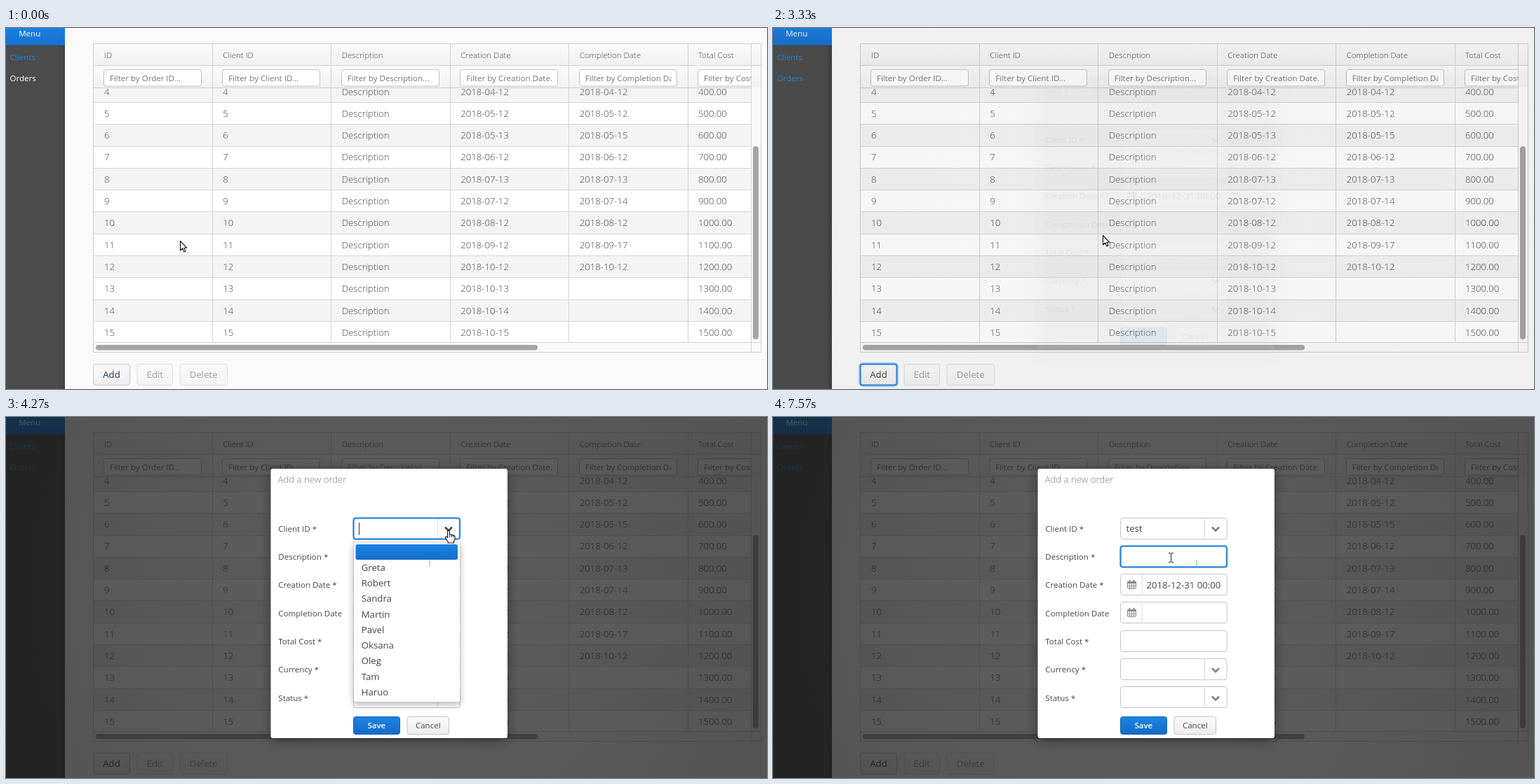
These frames come from a looping animation (1085 px wide and 516 px high, 8 s). An HTML page with a canvas:

```html
<!DOCTYPE html>
<html lang="en">
<head>
<meta charset="utf-8">
<title>Order form</title>
<style>
html, body { margin: 0; width: 100%; height: 100%; overflow: hidden; background: #fafafa; }
canvas { display: block; }
</style>
</head>
<body>
<canvas id="stage" width="1085" height="516"></canvas>
<script>
const W = 1085, H = 516, LOOP = 8000;
const ctx = document.getElementById('stage').getContext('2d');
const BIG = 13.2, SMALL = 11.54;
const BLUE = ['#1b85e2', '#166bc9'];
const COLS = [124.5, 294.5, 463.5, 633.5, 802.5, 972.5];
const TEXT_X = [140, 309.3, 478.8, 648.2, 817.7, 987];
const HEADERS = ['ID', 'Client ID', 'Description', 'Creation Date', 'Completion Date', 'Total Cost'];
const FILTERS = ['Order ID', 'Client ID', 'Description', 'Creation Date', 'Completion Date', 'Cost'];
const CREATED = ['04-12', '05-12', '05-13', '06-12', '07-13', '07-12', '08-12', '09-12', '10-12', '10-13', '10-14', '10-15'];
const DONE = ['04-12', '05-12', '05-15', '06-12', '07-13', '07-14', '08-12', '09-17', '10-12'];
const LABELS = ['Client ID *', 'Description *', 'Creation Date *', 'Completion Date', 'Total Cost *', 'Currency *', 'Status *'];
const PAGE_ONE = ['', 'Greta', 'Robert', 'Sandra', 'Martin', 'Pavel', 'Oksana', 'Oleg', 'Tam', 'Haruo'];
const PAGE_TWO = ['Mark', 'Doina', 'Tracy', 'Elena', 'Rosalie', 'Ibrahim', 'test'];

// Pointer path: time, x, y
const PATH = [
  [0, 248, 304], [309, 248, 304], [310, 247, 309], [400, 247, 309],
  [620, 205, 385], [860, 143, 482], [960, 143, 482], [1180, 164, 488],
  [1400, 173, 496], [1620, 145, 498], [1820, 130, 489], [2060, 168, 494],
  [2220, 158, 497], [2380, 149, 494], [2790, 149, 494], [3090, 285, 415],
  [3330, 469, 296], [3490, 588, 231], [3690, 594, 220], [3980, 627, 168],
  [4270, 631, 162], [4340, 631, 162], [4510, 582, 262], [4740, 560, 403],
  [4890, 558, 403], [5180, 556, 345], [5500, 551, 334], [6180, 551, 334],
  [6500, 557, 270], [6860, 567, 201], [8000, 567, 201]
];
// Pointer shape from each time on
const SHAPES = [[0, 'arrow'], [780, 'hand'], [2850, 'arrow'], [3450, 'beam'], [3650, 'arrow'],
  [3900, 'hand'], [6260, 'arrow'], [6400, 'beam'], [6620, 'arrow'], [6780, 'beam']];

const clamp = v => Math.max(0, Math.min(1, v));
const ramp = (t, from, to) => clamp((t - from) / (to - from));
const between = (t, a, b) => t >= a && t < b;

function pointerAt(t) {
  const i = PATH.findIndex(p => p[0] > t);
  const [t0, x0, y0] = PATH[i - 1], [t1, x1, y1] = PATH[i];
  const k = (t - t0) / (t1 - t0);
  return [x0 + (x1 - x0) * k, y0 + (y1 - y0) * k];
}

function text(str, x, cy, size, color, weight = 400, align = 'left') {
  ctx.font = `${weight} ${size}px "Open Sans", sans-serif`;
  ctx.textAlign = align;
  ctx.fillStyle = color;
  ctx.fillText(str, x, cy + size * 0.357);
}

function shade(y, h, [top, bottom]) {
  const g = ctx.createLinearGradient(0, y, 0, y + h);
  g.addColorStop(0, top);
  g.addColorStop(1, bottom);
  return g;
}

function rect(x, y, w, h, fill) {
  ctx.fillStyle = fill;
  ctx.fillRect(x, y, w, h);
}

function box(x, y, w, h, r, fill, stroke, line = 1) {
  ctx.beginPath();
  ctx.roundRect(x, y, w, h, r);
  if (fill) { ctx.fillStyle = fill; ctx.fill(); }
  if (stroke) { ctx.strokeStyle = stroke; ctx.lineWidth = line; ctx.stroke(); }
}

function line(points, color, width = 1) {
  ctx.beginPath();
  points.forEach(([x, y]) => ctx.lineTo(x, y));
  ctx.strokeStyle = color;
  ctx.lineWidth = width;
  ctx.stroke();
}

function clipped(x, y, w, h, draw) {
  ctx.save();
  ctx.beginPath();
  ctx.rect(x, y, w, h);
  ctx.clip();
  draw();
  ctx.restore();
}

function panel(x, y, w, h, blur, alpha) {
  ctx.save();
  ctx.shadowColor = `rgba(0,0,0,${alpha})`;
  ctx.shadowBlur = blur;
  ctx.shadowOffsetY = 3;
  box(x, y, w, h, 3, '#fff');
  ctx.restore();
}

function button(label, x, y, w, h, size, color = '#474747') {
  box(x, y, w, h, 3, shade(y, h, ['#fafafa', '#ededed']), '#c5c5c5');
  text(label, x + w / 2, y + h / 2, size, color, 400, 'center');
}

function sidebar(t) {
  rect(0, 0, 84, H, '#4b4c4b');
  const g = ctx.createLinearGradient(74, 0, 84, 0);
  g.addColorStop(0, 'rgba(0,0,0,0)');
  g.addColorStop(1, 'rgba(0,0,0,.16)');
  rect(74, 0, 10, H, g);
  rect(0, 0, 84, 25, shade(0, 25, ['#1a7fdd', '#1870cf']));
  rect(0, 24, 84, 1, '#155fae');
  text('Menu', 33.7, 8, SMALL, '#fff', 400, 'center');
  text('Clients', 5.5, 42, SMALL, '#2386e4');
  text('Orders', 5.5, 72, SMALL, t < 2610 ? '#fff' : '#2386e4');
}

function table() {
  rect(124, 22, 953, 442, '#fafafa');
  clipped(124, 85, 938, 365, () => {
    CREATED.forEach((date, i) => {
      const y = 75.6 + 31.3 * i, mid = y + 15.2, n = i + 4;
      rect(124, Math.round(y), 938, 32, i % 2 ? '#fff' : '#f4f4f4');
      rect(124, Math.round(y) - 1, 938, 1, '#d8d8d8');
      const done = DONE[i] ? '2018-' + DONE[i] : '';
      [n, n, 'Description', '2018-' + date, done, n + '00.00'].forEach((cell, c) =>
        text(String(cell), TEXT_X[c], mid, BIG, '#474747', 300));
    });
  });
  rect(124, 22, 953, 32, shade(22, 32, ['#fafafa', '#f1f1f1']));
  rect(124, 54, 953, 31, shade(54, 31, ['#fafafa', '#f1f1f1']));
  rect(124, 53, 953, 1, '#d4d4d4');
  rect(124, 85, 938, 1, '#d0d0d0');
  clipped(124, 22, 938, 64, () => {
    HEADERS.forEach((name, c) => {
      const x = TEXT_X[c];
      text(name, x, 38.5, SMALL, '#474747', 300);
      box(Math.round(x) - 0.5, 59.5, 139, 23.5, 3, '#fff', '#c2c2c2');
      clipped(x + 7, 60, 124, 23, () =>
        text(`Filter by ${FILTERS[c]}...`, x + 8, 71.5, SMALL, '#757575'));
    });
  });
  COLS.slice(1).forEach(x => line([[x, 22], [x, 450]], '#d4d4d4'));
  line([[1062.5, 22], [1062.5, 464]], '#d4d4d4');
  line([[124, 449.5], [1077, 449.5]], '#d4d4d4');
  box(1065, 169, 8, 276, 4, '#a5a5a5');
  box(128, 453, 630, 7.5, 4, '#a5a5a5');
  box(124.5, 22.5, 952, 441, 0, null, '#d0d0d0');
}

function toolbar(t) {
  button('Add', 124.5, 480.5, 52, 30, BIG, t < 2610 ? '#183a5e' : '#404040');
  if (between(t, 2610, 3400)) {
    box(124, 480, 53, 31, 4, null, 'rgba(25,125,225,.35)', 4);
    box(124.5, 480.5, 52, 30, 3, null, '#2180dc', 1.5);
  }
  ctx.globalAlpha = 0.5;
  button('Edit', 187, 480.5, 50.5, 30, BIG);
  button('Delete', 248, 480.5, 67.5, 30, BIG);
  ctx.globalAlpha = 1;
}

function curtain(t) {
  const g = ctx.createRadialGradient(W / 2, H / 2, 0, W / 2, H / 2, 600);
  g.addColorStop(0, '#222');
  g.addColorStop(1, '#131313');
  ctx.globalAlpha = 0.72 * ramp(t, 3310, 3680);
  rect(0, 0, W, H, g);
  ctx.globalAlpha = 1;
}

function chevron(y, color) {
  ctx.lineJoin = 'miter';
  line([[626, y - 2.5], [631, y + 2.5], [636, y - 2.5]], color, 2.6);
}

function calendar(x, y) {
  const c = '#8a8a8a';
  box(x - 5.5, y - 4.5, 12, 10, 1, null, c);
  rect(x - 6, y - 5, 13, 3, c);
  for (const dx of [-3.5, 2.5]) rect(x + dx, y - 7, 2, 4, c);
  for (const d of [-2.5, 0.5, 3.5]) line([[x + d, y - 2], [x + d, y + 6]], c, 0.8);
  for (const d of [0.5, 3]) line([[x - 5, y + d], [x + 6, y + d]], c, 0.8);
}

function field(i, focused, hot) {
  const y = 159.5 + 40.33 * i, top = Math.round(y - 15) - 0.5;
  text(LABELS[i], 388.3, y, SMALL, '#474747');
  box(495.5, top, 151.5, 30, 3, '#fff', '#c5c5c5');
  if (i === 0 || i > 4) {
    line([[615.5, top + 1], [615.5, top + 29]], '#dcdcdc');
    chevron(y + 0.5, hot ? '#474747' : '#808080');
  } else if (i === 2 || i === 3) {
    line([[526, top + 1], [526, top + 29]], '#dcdcdc');
    calendar(511, Math.round(y));
  }
  if (focused) {
    box(495.5, top, 151.5, 30, 3.5, null, 'rgba(25,125,225,.45)', 3);
    box(495.5, top, 151.5, 30, 3, null, '#2180dc', 1.5);
  }
}

function dialog(t) {
  ctx.globalAlpha = t < 3330 ? 0.07 * ramp(t, 3280, 3330) : 0.07 + 0.93 * ramp(t, 3330, 3470);
  panel(377.5, 74, 337.5, 385, 18, 0.4);
  text('Add a new order', 387.5, 89, BIG, '#7c7c7c', 300);
  const combo = between(t, 4040, 7020);
  LABELS.forEach((_, i) =>
    field(i, i === 0 ? combo : i === 1 && t >= 7020, i === 0 && between(t, 3940, 4400)));
  text('2018-12-31 00:00', 532.5, 240.2, BIG, '#474747');
  if (t >= 5420) text('test', 503.5, 159.5, BIG, '#474747');
  box(495.5, 428.5, 66, 25, 3, shade(428, 25, BLUE), '#1362b5');
  text('Save', 528.3, 441, SMALL, '#fff', 600, 'center');
  button('Cancel', 572, 428.5, 59.5, 25, SMALL);

  const comboCaret = between(t, 4080, 4590) || between(t, 5000, 5420);
  if (comboCaret) rect(503, 151, 1, 18, '#333');
  if (between(t, 5420, 5750) || between(t, 6260, 6780)) rect(526, 151, 1, 18, '#333');
  if (between(t, 7060, 7570)) rect(503, 191, 1, 18, '#333');
  ctx.globalAlpha = 1;
}

function popup(t, py) {
  const second = t >= 4890;
  const names = second ? PAGE_TWO : PAGE_ONE;
  const row = Math.floor((py - 182) / 22.25);
  let active = t < 4400 ? 0 : Math.max(0, Math.min(names.length - 1, row));
  if (t >= 5180) active = 6;
  if (second) {
    box(594, 405, 50, 21, 3, '#d9d9d9');
    text('10-16/16', 619, 417, 9.5, '#777', 400, 'center');
  }
  panel(495.5, 179, 152, 228.5, 8, 0.3);
  box(495.5, 179, 152, 228.5, 3, null, 'rgba(0,0,0,.12)');
  names.forEach((name, i) => {
    const y = 193 + 22.25 * i, on = i === active;
    if (on) box(498.5, y - 11, 145.5, 22, 2, shade(y - 11, 22, BLUE));
    text(name, 506.7, y, BIG, on ? '#fff' : '#474747');
  });
  if (second) {
    ctx.beginPath();
    ctx.moveTo(633, 192);
    ctx.lineTo(637, 188);
    ctx.lineTo(641, 192);
    ctx.fillStyle = '#c8c8c8';
    ctx.fill();
  }
}

const OUTLINE = {
  arrow: 'M.5 .5V14L3.6 11L5.9 16L8 15L5.8 10.3H9.8Z',
  hand: 'M-1.4 1Q0 -.8 1.4 1V6.2Q3 5.2 4.2 6.7Q5.8 5.8 6.8 7.4Q8.8 6.9 9 9V12.5L7.5 15V18H-.8V16L-4.6 10.8Q-4.8 8.6 -2.9 9.2L-1.4 10.6Z'
};

function pointer(t, x, y) {
  const shape = SHAPES.filter(s => s[0] <= t).pop()[1];
  ctx.save();
  ctx.translate(Math.round(x), Math.round(y));
  if (shape === 'beam') {
    const c = '#222';
    line([[0.5, -6], [0.5, 6]], c);
    for (const dy of [-6.5, 6.5]) {
      line([[-3, dy], [0, dy]], c);
      line([[1, dy], [4, dy]], c);
    }
  } else {
    const p = new Path2D(OUTLINE[shape]);
    ctx.fillStyle = '#fff';
    ctx.fill(p);
    ctx.lineJoin = 'round';
    ctx.lineWidth = 1.1;
    ctx.strokeStyle = '#111';
    ctx.stroke(p);
    if (shape === 'hand') {
      for (const dx of [1.4, 4.2, 6.8]) line([[dx, 6.5], [dx, 10]], '#111', 0.9);
    }
  }
  ctx.restore();
}

function frame(now) {
  const t = now % LOOP, [x, y] = pointerAt(t);
  rect(0, 0, W, H, '#fafafa');
  sidebar(t);
  table();
  toolbar(t);
  if (t >= 3280) {
    curtain(t);
    dialog(t);
    if (between(t, 4110, 6220)) popup(t, y);
    if (t >= 3730) rect(603.5, 204, 1, 10, '#5fd35f');
  }
  pointer(t, x, y);
  requestAnimationFrame(frame);
}
requestAnimationFrame(frame);
</script>
</body>
</html>
```
